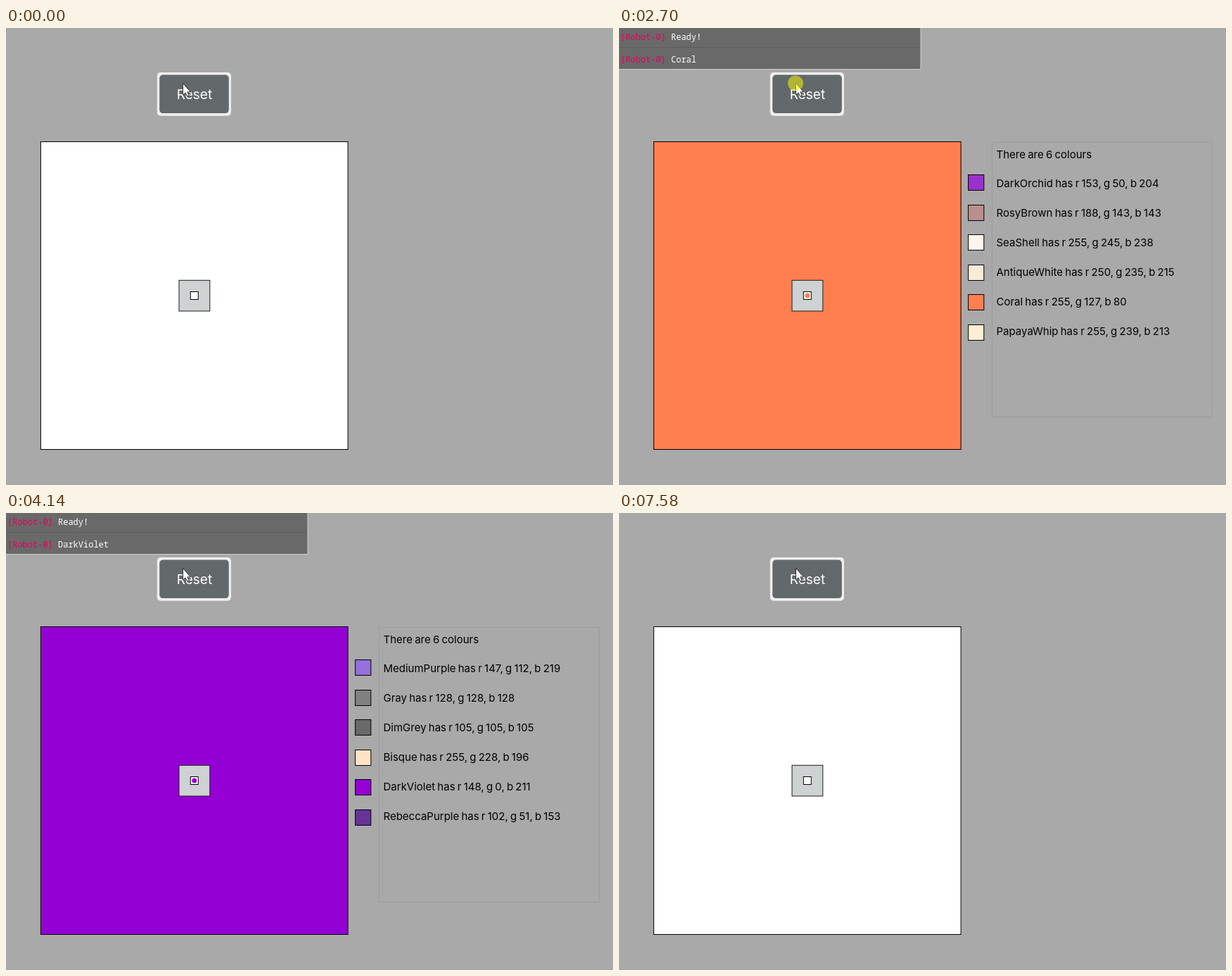
Recreate the animation shown at these times as an HTML page. Size 863 by 649 pixels, loop 8 s.

```html
<!DOCTYPE html>
<html lang="en">
<head>
<meta charset="utf-8">
<title>Colour picker robot</title>
<style>
html, body { margin: 0; width: 100%; height: 100%; overflow: hidden; background: #a9a9a9; }
svg { display: block; width: 863px; height: 649px; }
.label { font: 15px Inter, sans-serif; word-spacing: -1px; }
.button { font: 19px Inter, sans-serif; fill: #fff; text-anchor: middle; }
.log { font: 12px "Noto Sans Mono", monospace; fill: #fff; white-space: pre; }
.log .who { fill: #e8005d; }
</style>
</head>
<body>
<svg id="stage" viewBox="0 0 863 649"></svg>
<script>
const LOOP = 8000;
const rounds = [
  {
    start: 1020, dot: 1050, named: 1250, expire: Infinity, press: 2700, reset: 2790, end: 2820, pick: 4,
    colours: [["DarkOrchid", 153, 50, 204], ["RosyBrown", 188, 143, 143], ["SeaShell", 255, 245, 238],
      ["AntiqueWhite", 250, 235, 215], ["Coral", 255, 127, 80], ["PapayaWhip", 255, 239, 213]]
  },
  {
    start: 3910, dot: 3910, named: 4140, expire: 6940, press: 7420, reset: 7540, end: 7580, pick: 4,
    colours: [["MediumPurple", 147, 112, 219], ["Gray", 128, 128, 128], ["DimGrey", 105, 105, 105],
      ["Bisque", 255, 228, 196], ["DarkViolet", 148, 0, 211], ["RebeccaPurple", 102, 51, 153]]
  }
];

const rect = (x, y, w, h, fill, extra = "") =>
  `<rect x="${x}" y="${y}" width="${w}" height="${h}" fill="${fill}" ${extra}/>`;
const text = (x, y, cls, str) => `<text x="${x}" y="${y}" class="${cls}">${str}</text>`;
const black = 'stroke="#000"';

function logPanel(messages) {
  const bottom = messages.length * 32 - 5.3;
  let out = rect(0, 0, 429, bottom, "#696969") +
    `<path d="M0 ${bottom}H429V0" fill="none" stroke="#d3d3d3"/>`;
  messages.forEach((msg, i) => {
    if (i) out += `<path d="M0 ${i * 32 - 4.5}H428" stroke="#5e5e5e"/>`;
    out += text(2, 17 + i * 32, "log", `<tspan class="who">[Robot-0]</tspan> ${msg}`);
  });
  return out;
}

function palette(colours) {
  let out = rect(530.5, 162.5, 313, 390, "none", 'stroke="#9d9d9d"') +
    text(536.5, 184.5, "label", `There are ${colours.length} colours`);
  colours.forEach(([name, r, g, b], i) => {
    out += rect(496.6, Math.round(208.4 + i * 42.5) + 0.5, 22.2, 22, `rgb(${r},${g},${b})`, black) +
      text(536.5, 184.5 + (i + 1) * 41.9, "label", `${name} has r ${r}, g ${g}, b ${b}`);
  });
  return out;
}

function arena(fill, dot) {
  return rect(49.4, 161.5, 436.7, 437, fill, black) +
    rect(246, 358.3, 43.8, 43.7, "#ced2d2", 'stroke="#1c1c1c"') +
    rect(262.3, 374.5, 11, 11, "#fff", black) +
    (dot ? `<circle cx="267.8" cy="380" r="3.5" fill="${fill}"/>` : "");
}

const button = rect(214.8, 63, 105.2, 61.8, "#eee", 'rx="5"') +
  rect(218.2, 66.5, 98.6, 54.6, "#63686a", 'rx="5"') +
  text(268, 100.5, "button", "Reset");
const cursor = '<path d="M251.5 78.5V95L255 91.8L257.6 97L260.2 95.7L257.8 90.8H262.3Z" ' +
  'fill="#fff" stroke="#222" stroke-width=".9" stroke-linejoin="round"/>';

// The click halo holds briefly, then fades.
function halo(t, { press, end }) {
  if (t < press || t >= end) return "";
  const k = Math.max(0, (t - press - 30) / (end - press - 30));
  return `<circle cx="251" cy="78.5" r="11" fill="#ff0" opacity="${0.5 * (1 - k)}"/>`;
}

function scene(t) {
  const live = rounds.find(r => t >= r.start && t < r.reset);
  let out = "";
  if (live) {
    const [name, r, g, b] = live.colours[live.pick];
    const messages = [];
    if (t < live.expire) messages.push("Ready!");
    if (t >= live.named) messages.push(name);
    out = logPanel(messages) + arena(`rgb(${r},${g},${b})`, t >= live.dot) + palette(live.colours);
  } else {
    out = arena("#fff", false);
  }
  return out + button + cursor + rounds.map(r => halo(t, r)).join("");
}

const stage = document.getElementById("stage");
const began = performance.now();
let last = "";

function draw() {
  const now = scene((performance.now() - began) % LOOP);
  if (now !== last) stage.innerHTML = last = now;
  requestAnimationFrame(draw);
}
draw();
</script>
</body>
</html>
```
